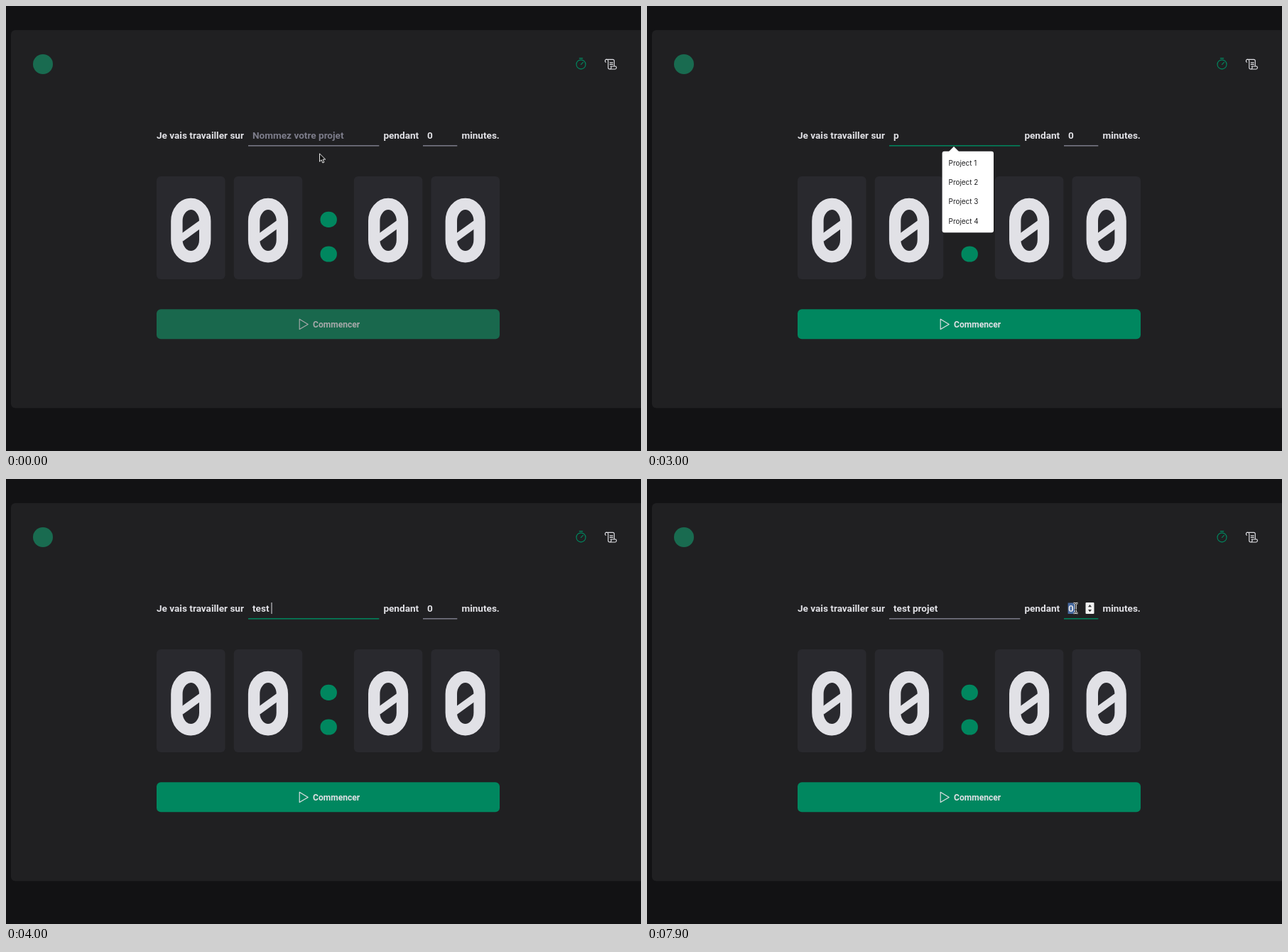
These frames come from a looping animation (894 px wide and 627 px high, 8000 ms). An HTML page:

```html
<!DOCTYPE html>
<html lang="fr">
<head>
<meta charset="utf-8">
<title>Minuteur</title>
<style>
  html, body { margin: 0; width: 100%; height: 100%; overflow: hidden; background: #121214; }
  svg { display: block; }
  text { font: bold 13.59px Roboto, sans-serif; fill: #e1e1e6; white-space: pre; }
  #popup text { font: 9.9px Inter, sans-serif; fill: #1c1c1e; }
  #label { font-size: 12.08px; }
  .line { fill: none; stroke: #e1e1e6; stroke-width: 1.15; stroke-linejoin: round; stroke-linecap: round; }
</style>
</head>
<body>
<svg width="894" height="627" viewBox="0 0 894 627">
  <defs>
    <g id="digit">
      <rect width="96.6" height="144.9" rx="6" fill="#29292e"/>
      <g fill="none" stroke="#e1e1e6">
        <rect x="28.4" y="38.9" width="39.8" height="74.4" rx="19.9" ry="24" stroke-width="16.4"/>
        <path d="M34 87.5L63 66.5" stroke-width="10"/>
      </g>
    </g>
    <path id="beam" d="M-3-7Q0-7 0-5Q0-7 3-7M0-5V5M-3 7Q0 7 0 5Q0 7 3 7M-1.5 2H1.5" fill="none"/>
  </defs>

  <rect x="7" y="34" width="900" height="532.6" rx="6" fill="#202022"/>
  <circle cx="52" cy="82" r="14" fill="#196b50"/>
  <g class="line" style="stroke:#00875f">
    <circle cx="809.5" cy="82.3" r="6.5"/>
    <path d="M807.3 73.6h4.4M809.5 82.3l3-3"/>
  </g>
  <path class="line" d="M844.4 79.2a2.2 2.2 0 1 1 3.4-1.6v9.2a2.2 2.2 0 0 0 2.2 2.2h7a2.2 2.2 0 0 0 1.5-4h-7.3a2.2 2.2 0 0 1-1.4 4M845.8 75.4h8.5a2 2 0 0 1 2 2v7.4M850.3 79.8h4M850.3 82.4h4"/>

  <text x="212" y="187.3">Je vais travailler sur</text>
  <text x="531.4" y="187.3">pendant</text>
  <text x="641.4" y="187.3">minutes.</text>
  <rect id="projectLine" x="341" y="196.1" width="184.3" height="1.5"/>
  <rect id="minutesLine" x="587" y="196.1" width="48.3" height="1.5"/>
  <rect id="selection" x="592.6" y="174.5" width="9.4" height="15.5" fill="#46699f"/>
  <text id="project" x="347" y="186.6"></text>
  <text x="593" y="186.6">0</text>
  <g id="spinner">
    <rect x="617.5" y="174" width="12" height="16" rx="1" fill="#f2f2f2"/>
    <path d="M621 180.2l2.5-3.2 2.5 3.2zM621 184l2.5 3.2 2.5-3.2z" fill="#333"/>
  </g>
  <rect id="caret" y="174" width="1" height="16" fill="#e1e1e6"/>

  <use href="#digit" x="212" y="240"/>
  <use href="#digit" x="320.7" y="240"/>
  <use href="#digit" x="489.8" y="240"/>
  <use href="#digit" x="598.4" y="240"/>
  <g fill="#00875f">
    <rect x="442.5" y="289.8" width="23.4" height="22.2" rx="11.2" ry="10.8"/>
    <rect x="442.5" y="338.4" width="23.4" height="22.2" rx="11.2" ry="10.8"/>
  </g>

  <rect id="button" x="212" y="427.2" width="483" height="42" rx="6"/>
  <path id="play" class="line" d="M413.2 441.2v14.4l12-7.2z"/>
  <text id="label" x="432" y="452.6">Commencer</text>

  <g id="popup">
    <path d="M424 206l8-8 8 8z" fill="#fff"/>
    <rect x="415.6" y="204.7" width="72.4" height="114.6" rx="3" fill="#fff"/>
    <text x="424.6" y="225">Project 1</text>
    <text x="424.6" y="252.2">Project 2</text>
    <text x="424.6" y="279.3">Project 3</text>
    <text x="424.6" y="306.5">Project 4</text>
  </g>

  <g id="pointer">
    <path id="arrow" d="M0 0v11.2l2.6-2.4 1.8 4.2 2-.9-1.8-4h3.6z" fill="#111" stroke="#fff" stroke-width=".9"/>
    <g id="ibeam">
      <use href="#beam" stroke="#fff" stroke-width="2.6"/>
      <use href="#beam" stroke="#111" stroke-width="1"/>
    </g>
  </g>
</svg>
<script>
const $ = id => document.getElementById(id);
const show = (id, on) => $(id).setAttribute('visibility', on ? 'visible' : 'hidden');
const fill = (id, color) => { $(id).style.fill = color; };

// Each entry restarts the caret blink: [time, text]
const typing = [
  [500, ''], [2400, 'p'], [3200, ''], [3300, 't'], [3400, 'te'], [3600, 'tes'],
  [3800, 'test'], [4000, 'test '], [4200, 'test p'], [4500, 'test pro'],
  [5100, 'test proj'], [5200, 'test proje'], [5300, 'test projet'], [6500, 'test projet']
];
typing.splice(9, 0, [4400, 'test pro']);

// Pointer path: [time, x, y]
const path = [
  [0, 441.5, 208], [100, 441.5, 208], [300, 438, 197], [5900, 438, 197],
  [6000, 440, 203], [6500, 600, 182], [7700, 600, 182], [7800, 603.5, 182], [8000, 603.5, 182]
];

function pointerAt(t) {
  const i = path.findIndex(p => p[0] > t);
  const [a, b] = [path[i - 1], path[i]];
  const k = (t - a[0]) / (b[0] - a[0]);
  const ease = k * k * (3 - 2 * k);
  return [a[1] + (b[1] - a[1]) * ease, a[2] + (b[2] - a[2]) * ease];
}

function draw(t) {
  const [since, text] = typing.filter(e => e[0] <= t).pop() || [0, ''];
  const onProject = t >= 500 && t < 6500;
  const onMinutes = t >= 6500;
  const selected = t >= 7900;

  $('project').textContent = text || 'Nommez votre projet';
  fill('project', text ? '#e1e1e6' : '#7c7c8a');
  fill('projectLine', onProject ? '#00875f' : '#7c7c8a');
  fill('minutesLine', onMinutes ? '#00875f' : '#7c7c8a');

  const end = text ? $('project').getComputedTextLength() : 0;
  $('caret').setAttribute('x', onMinutes ? 600.6 : 346.6 + end);
  show('caret', (onProject || onMinutes) && !selected && (t - since) % 1000 < 500);
  show('selection', selected);
  show('popup', t >= 500 && t < 3400);

  const ink = text ? '#e1e1e6' : '#a7a9aa';
  fill('button', text ? '#00875f' : '#19684d');
  fill('label', ink);
  $('play').style.stroke = ink;

  const [x, y] = pointerAt(t);
  const visible = t < 2400 || t >= 6000;
  const overField = y < 199 && (x < 526 || x > 587);
  $('pointer').setAttribute('transform', `translate(${x} ${y})`);
  show('arrow', visible && !overField);
  show('ibeam', visible && overField);
  show('spinner', visible && x > 587);
}

function tick() {
  draw(Math.floor(performance.now() % 8000 / 100) * 100);
  requestAnimationFrame(tick);
}
tick();
</script>
</body>
</html>
```
